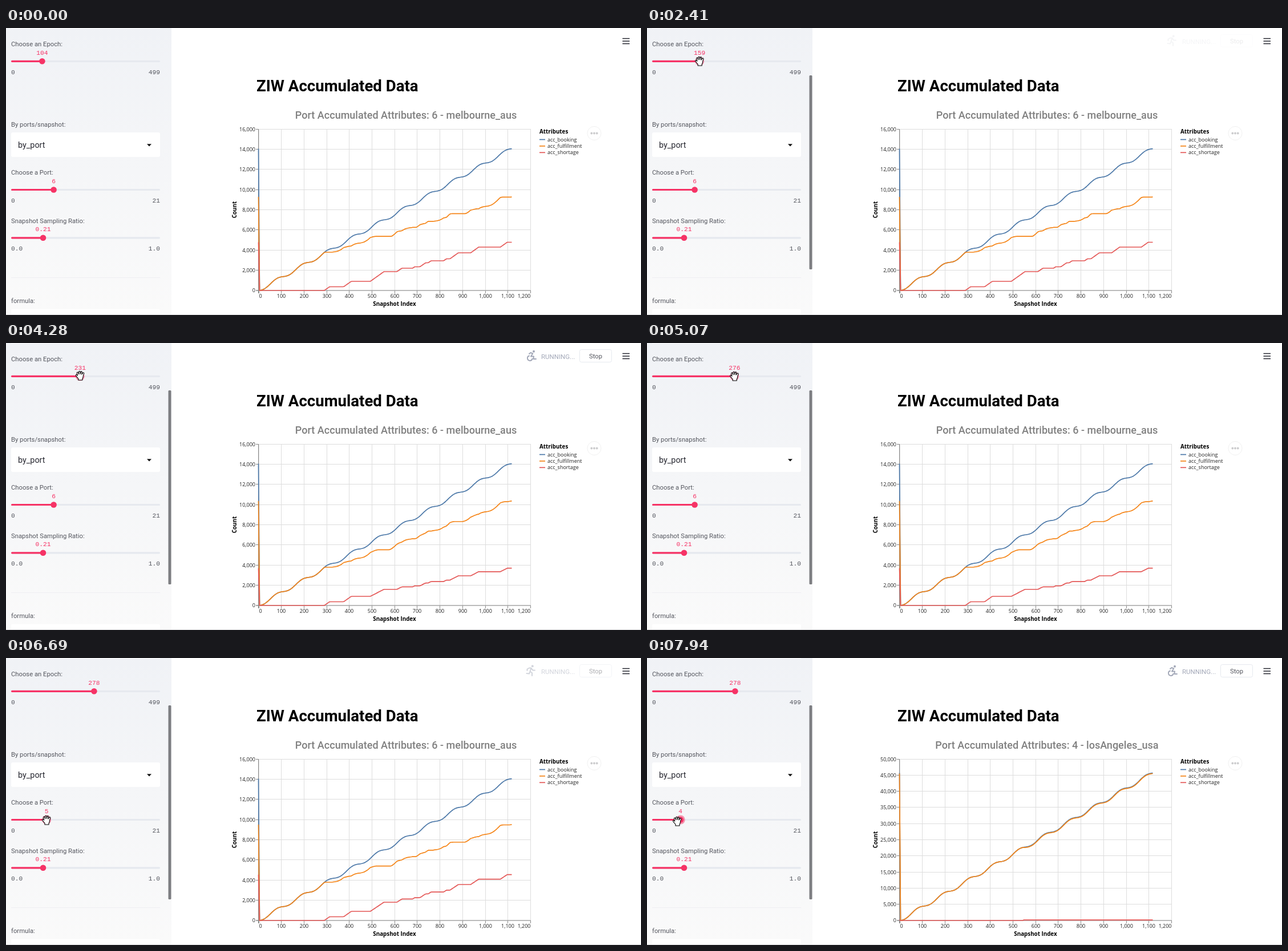
Write an HTML page that moves like this. It is 1113 by 503 pixels and loops after 8 s.

```html
<!DOCTYPE html>
<html lang="en">
<head>
<meta charset="utf-8">
<title>Accumulated Data</title>
<style>
html, body { margin: 0; width: 100%; height: 100%; overflow: hidden; background: #fff; }
svg { display: block; width: 1113px; height: 503px; }
text { white-space: pre; }
.label { font: 11.25px Roboto, sans-serif; fill: #54565e; }
.mono { font: 11.2px "Liberation Mono", monospace; fill: #54565e; }
.value { font: 11.2px "Liberation Mono", monospace; fill: #f63366; }
.pick { font: 14.4px Roboto, sans-serif; fill: #262730; }
.head { font: bold 27.6px Roboto, sans-serif; }
.title { font: 500 18.05px Roboto, sans-serif; fill: #808080; }
.tick { font: 9px "Open Sans", sans-serif; fill: #222; }
.axis { font: bold 9.8px "Open Sans", sans-serif; }
.run { font: 11.5px Roboto, sans-serif; fill: #a3a8b8; }
</style>
</head>
<body>
<svg id="stage" viewBox="0 0 1113 503"></svg>
<script>
const LOOP = 8000, LEFT = 442.5, BASE = 460, SPAN = 444;
const TRACK = 9, TRACK_W = 261, PINK = '#f63366', GREY = '#a3a8b8';
const COLORS = ['#4c78a8', '#f58518', '#e45756'];

const text = (x, y, s, cls, anchor = 'start', extra = '') =>
  `<text x="${x}" y="${y}" class="${cls}" text-anchor="${anchor}" ${extra}>${s}</text>`;
const rect = (x, y, w, h, fill, extra = '') =>
  `<rect x="${x}" y="${y}" width="${w}" height="${h}" fill="${fill}" ${extra}/>`;
const path = (d, stroke, width = 1, extra = '') =>
  `<path d="${d}" fill="none" stroke="${stroke}" stroke-width="${width}" ${extra}/>`;
const dot = (x, y, r, fill, extra = '') =>
  `<circle cx="${x}" cy="${y}" r="${r}" fill="${fill}" ${extra}/>`;
const get = id => document.getElementById(id);
const set = (id, name, value) => get(id).setAttribute(name, value);
const number = n => n.toLocaleString('en-US');
const clamp = v => Math.min(1, Math.max(0, v));
const ease = v => v * v * (3 - 2 * v);
const fade = (t, from, to) => clamp((t - from) / 190) * clamp(1 - (t - to) / 260);

// Stock-outs: [place, rise]; the first two are the same in every epoch
const stairs = [[120, 6.5], [156, 9.5], [208, 17], [247, 6], [272, 2.5], [288, 7],
  [300, 3.5], [327, 3.5], [343, 10.5], [379, 10], [430, 8.5]];
const shortage = (u, gain) => stairs.reduce((sum, [x, rise], i) =>
  sum + rise * (i < 2 ? 1 : gain) * clamp((u - x) / rise / 1.4 + .5), 0);

function curve(f) {
  let d = `M${LEFT},${BASE - f(SPAN)}`;
  for (let u = 2; u <= SPAN; u += 2) d += `L${LEFT + u},${(BASE - f(u)).toFixed(2)}`;
  return path(d, COLORS[f.color], 1.7, 'stroke-linejoin="round"');
}

// How much the later shortages weigh in each run; the last run is another port
const gains = [1, .86, .72, .94, 0];

function chart(view) {
  const big = view === gains.length - 1;
  const slope = big ? .583 : .5605, steps = big ? 10 : 8, unit = big ? 5000 : 2000;
  const book = u => slope * (u - 5.3 * Math.sin(2 * Math.PI * (u + 1) / 44.4));
  const lack = u => big ? .9 * clamp(u - 216) : shortage(u, gains[view]);
  // Fulfilled orders never drop
  const met = [0];
  for (let u = 1; u <= SPAN; u++) met[u] = Math.max(met[u - 1], book(u) - lack(u));

  let out = '';
  for (let k = 0; k <= steps; k++) {
    const y = Math.floor(BASE - k * 283 / steps) + (k ? .5 : 0);
    out += path(`M443,${y}H919`, '#ddd') + path(`M438,${y}h5`, '#888')
      + text(437, y + 3.2, number(k * unit), 'tick', 'end');
  }
  out += path('M442.5,177V465M438,460H919.5', '#888');
  return out + [book, u => met[u], lack]
    .map((f, color) => curve(Object.assign(f, { color }))).join('');
}

function slider(id, y, label, min, max) {
  return text(TRACK, y - 26.2, label, 'label')
    + rect(TRACK, y - 1.6, TRACK_W, 3.2, '#e6e9ef', 'rx="1.6"')
    + rect(TRACK, y - 1.6, 0, 3.2, PINK, `id="${id}Bar" rx="1.6"`)
    + dot(0, y, 8, PINK, `id="${id}Halo"`)
    + dot(0, y, 5.3, PINK, `id="${id}Thumb"`)
    + text(0, y - 11.4, '', 'value', 'middle', `id="${id}Value"`)
    + text(TRACK, y + 22.3, min, 'mono')
    + text(TRACK + TRACK_W, y + 22.3, max, 'mono', 'end');
}

function setSlider(id, x, value, active) {
  set(id + 'Bar', 'width', x - TRACK);
  set(id + 'Halo', 'cx', x);
  set(id + 'Halo', 'opacity', active ? .5 : 0);
  set(id + 'Thumb', 'cx', x);
  set(id + 'Value', 'x', x);
  get(id + 'Value').textContent = value;
}

const toX = (value, max) => TRACK + value / max * TRACK_W;
const toValue = (x, max) => Math.round((x - TRACK) / TRACK_W * max);

function sidebar() {
  return '<linearGradient id="shade" x2="0" y2="1"><stop stop-color="#f0f2f6"/>'
    + '<stop offset="1" stop-color="#fafafa"/></linearGradient>'
    + rect(0, 0, 290, 503, 'url(#shade)') + rect(9, 0, 261, 1, '#fff')
    + slider('epoch', 58.3, 'Choose an Epoch:', '0', '499')
    + text(9, 172.5, 'By ports/snapshot:', 'label')
    + rect(9, 183, 261, 43, '#fff', 'rx="3"') + text(21, 210, 'by_port', 'pick')
    + '<path d="M247,203.3h8l-4,4.2z" fill="#111"/>'
    + slider('port', 283.5, 'Choose a Port:', '0', '21')
    + slider('ratio', 367.8, 'Snapshot Sampling Ratio:', '0.0', '1.0')
    + path('M9,437.5H270', '#efeff2') + text(9, 482, 'formula:', 'label')
    + rect(9, 492.5, 261, 14, '#fff', 'rx="3"')
    + rect(284.5, 83, 5, 340, '#7d7e82', 'id="scroll" rx="1.5"');
}

function frame() {
  let out = text(439, 110.5, 'ZIW Accumulated Data', 'head')
    + text(701, 158.5, '', 'title', 'middle', 'id="title"');
  for (let k = 0; k <= 12; k++) {
    const x = Math.floor(443 + k * 39.7) + .5;
    out += path(`M${x},177V460`, '#ddd') + path(`M${x},460v5`, '#888')
      + text(x, 473, number(k * 100), 'tick', k === 12 ? 'end' : k ? 'middle' : 'start');
  }
  out += '<g id="chart"></g>' + text(681, 486.5, 'Snapshot Index', 'axis', 'middle')
    + text(0, 0, 'Count', 'axis', 'middle', 'transform="translate(403.5 318.5) rotate(-90)"')
    + text(935, 184.5, 'Attributes', 'axis');
  ['acc_booking', 'acc_fulfillment', 'acc_shortage'].forEach((name, i) => {
    const y = 195.5 + i * 11.4;
    out += path(`M935,${y}h10`, COLORS[i], 1.7) + text(949, y + 3, name, 'tick');
  });
  return out + '<g id="more">' + dot(1031, 184.5, 12, '#fff', 'stroke="#bbb"')
    + [-4.7, 0, 4.7].map(dx => dot(1031 + dx, 184.5, 1.9, '#1b1e23')).join('') + '</g>';
}

function topBar() {
  const limbs = d => path(d, GREY, 2, 'stroke-linecap="round" stroke-linejoin="round"');
  return path('M1080.5,18.5h12.5m-12.5,4.5h12.5m-12.5,4.5h12.5', '#262730', 1.7)
    + '<g id="status"><g id="runner">' + dot(922.8, 14.2, 2, GREY)
    + limbs('M913.5,22V19.5L917,17.5H920.5L918.5,23.5L922,26V31M918.5,24L917,27.5L912.5,27M921,18.5L923.5,21.5H927')
    + '</g><g id="wheels">' + dot(925, 14.7, 2, GREY)
    + limbs('M917,19L919.5,17L923.3,18.5L920,23.5H925L924.5,28H929M917,22.5A4.3,4.3 0 1 0 922.5,27.5')
    + '</g>' + text(938, 27.5, 'RUNNING...', 'run')
    + rect(1005.5, 11.5, 56, 22, '#fff', 'rx="3" stroke="#e6e9ef"')
    + text(1033.5, 26.5, 'Stop', 'label', 'middle') + '</g>';
}

const hand = '<path id="hand" fill="#fff" stroke="#000" stroke-width="1.1" stroke-linejoin="round" '
  + 'd="M-3,8V5.5L-7,.8Q-8,-1 -6.8,-1.5Q-5.8,-1.8 -4.3,.2L-5.4,-4.2Q-5.6,-5.9 -4.5,-6Q-3.5,-6 -3,-4.6'
  + 'L-2.2,-2.2L-2.3,-6.4Q-2.2,-7.8 -1.1,-7.8Q0,-7.8 .1,-6.4L.4,-2.5L1.2,-6.2Q1.6,-7.4 2.6,-7.1'
  + 'Q3.6,-6.8 3.4,-5.5L2.9,-2L4.8,-4.6Q5.7,-5.5 6.5,-4.9Q7.3,-4.2 6.7,-3Q5.4,-.6 5.3,2Q5.2,4.2 4,5.7V8Z"/>';

get('stage').innerHTML = sidebar() + frame() + topBar() + path('M0,502.5H1113', '#d6d6d8') + hand;
setSlider('ratio', 65, '0.21', false);

// Pointer moves: start, duration, goal
const [first, second, third, fourth] = [104, 159, 231, 278].map(v => toX(v, 499));
const moves = [
  [440, 690, 54, 55], [1280, 100, 69, 71], [1600, 80, first, 57],
  [1870, 400, second, 58], [3120, 280, second, 74], [3500, 60, second, 58],
  [3560, 150, third, 57], [4330, 290, third, 74], [4800, 80, third, 58],
  [4880, 220, fourth, 58], [5650, 190, 87, 280],
  [6150, 200, 71, 284], [7300, 400, 53, 286]
];
function pointer(t) {
  let x = 600, y = 512;
  for (const [start, time, goalX, goalY] of moves) {
    const p = ease(clamp((t - start) / time));
    x += (goalX - x) * p;
    y += (goalY - y) * p;
  }
  return [x, y];
}

// Each run: start and end of the status note; its chart arrives after a wait
const runs = [[2390, 3120], [3490, 4400], [5100, 5580], [6600, LOOP]];
const WAIT = 470;
let shown = -1;

function draw(now) {
  const t = now % LOOP;
  const [x, y] = pointer(t);
  set('hand', 'transform', `translate(${x} ${y})`);
  set('scroll', 'opacity', x < 290 ? 1 : 0);

  const epoch = t < 1870 ? 104 : t < 5650 ? toValue(x, 499) : 278;
  const port = t < 6150 ? 6 : toValue(x, 21);
  setSlider('epoch', toX(epoch, 499), epoch, t >= 1680 && t < 6150);
  setSlider('port', toX(port, 21), port, t >= 6150);

  const view = runs.filter(([start]) => t >= start + WAIT).length;
  if (view !== shown) get('chart').innerHTML = chart(shown = view);
  get('title').textContent = 'Port Accumulated Attributes: '
    + (t < 6920 ? '6 - melbourne_aus' : t < 7940 ? '5 - manzanillo_mex' : '4 - losAngeles_usa');

  const odd = Math.floor(t / 140) % 2;
  set('runner', 'opacity', odd);
  set('wheels', 'opacity', 1 - odd);
  set('status', 'opacity', Math.max(...runs.map(([from, to]) => fade(t, from, to))));
  set('more', 'opacity', .22 + .78 * fade(t, 440, 800));
}

const start = performance.now();
function tick() {
  draw(performance.now() - start);
  requestAnimationFrame(tick);
}
tick();
</script>
</body>
</html>
```
